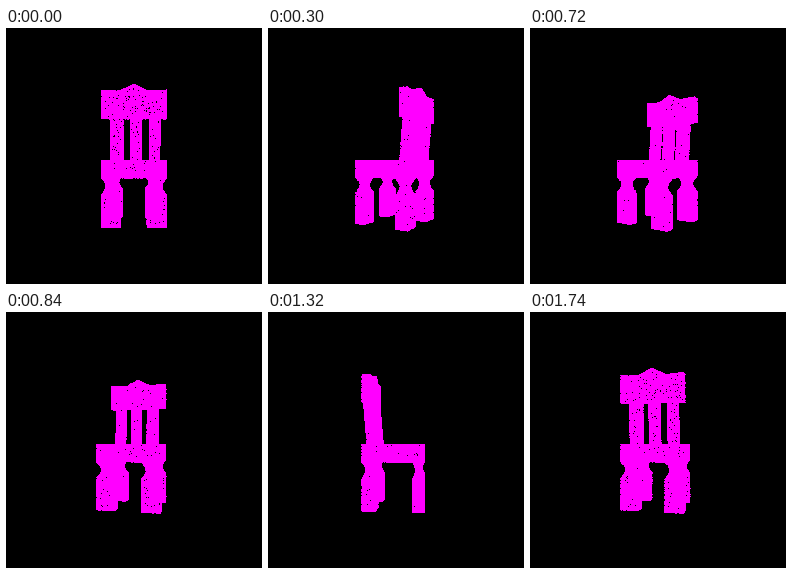
Write an HTML page with a canvas that moves like this. It is 256 px wide and 256 px high and loops after 1.8 s.

```html
<!DOCTYPE html>
<html lang="en">
<head>
<meta charset="utf-8">
<title>Turning chair</title>
<style>
  html, body { margin: 0; width: 100%; height: 100%; overflow: hidden; background: #000; }
  canvas { display: block; width: 256px; height: 256px; }
</style>
</head>
<body>
<canvas id="stage" width="256" height="256"></canvas>
<script>
const SIZE = 256, STEP_MS = 60, STEPS = 30;
const CENTER_X = 128, HORIZON = 132, CAMERA = 275;
const HALF_W = 29.3, HALF_D = 28, DENSITY = 1.9;
const BLACK = 0xff000000, MAGENTA = 0xffff00ff;

const ctx = document.getElementById('stage').getContext('2d');
const picture = ctx.createImageData(SIZE, SIZE);
const pixels = new Uint32Array(picture.data.buffer);

let seed = 7;
function random() {
  seed = (Math.imul(seed, 1664525) + 1013904223) >>> 0;
  return seed / 4294967296;
}

const points = [];

// Scatters points over the six faces of a box, then bends them with warp.
function addBox(min, max, warp = p => p) {
  const size = max.map((v, i) => v - min[i]);
  for (let axis = 0; axis < 3; axis++) {
    const area = size[(axis + 1) % 3] * size[(axis + 2) % 3];
    for (const side of [0, 1]) {
      for (let n = Math.round(area * DENSITY); n > 0; n--) {
        const p = min.map((v, i) => v + size[i] * (i === axis ? side : random()));
        points.push(warp(p));
      }
    }
  }
}

function addRail() {
  const bottom = 38;
  const crest = x => 62 + 6.3 * Math.max(0, 1 - Math.abs(x) / 13) + (x / HALF_W) ** 2;
  addBox([-HALF_W, bottom, 20], [HALF_W, bottom + 25, HALF_D],
    ([x, y, z]) => [x, bottom + (y - bottom) / 25 * (crest(x) - bottom), z]);
}

// Spindles lean back towards the rail.
function addSpindle(left, right) {
  const height = 39;
  addBox([left, 0, 16], [right, height, 24.5],
    ([x, y, z]) => [x, y, z + 3.5 * y / height]);
}

// Legs are square with a narrow neck below the seat.
function addLeg(x0, x1, z0, z1) {
  const cx = (x0 + x1) / 2, cz = (z0 + z1) / 2;
  addBox([x0, -61, z0], [x1, -16, z1], ([x, y, z]) => {
    const u = Math.min(1, Math.max(0, (-y - 16.5) / 15));
    const k = 1 - 0.45 * Math.sin(Math.PI * u);
    return [cx + (x - cx) * k, y, cz + (z - cz) * k];
  });
}

addRail();
addSpindle(-21.3, -10.2);
addSpindle(-2.8, 6.4);
addSpindle(14.2, 23.6);
addBox([-HALF_W, -16.2, -HALF_D], [HALF_W, 0, HALF_D]);
for (const [x0, x1] of [[-HALF_W, -12.7], [12.2, HALF_W]]) {
  addLeg(x0, x1, -HALF_D, -HALF_D + 10);
  addLeg(x0, x1, HALF_D - 12, HALF_D);
}

function draw(angle) {
  const c = Math.cos(angle), s = Math.sin(angle);
  pixels.fill(BLACK);
  for (const [x, y, z] of points) {
    const scale = CAMERA / (CAMERA - (z * c - x * s));
    const px = Math.floor(CENTER_X + (x * c + z * s) * scale);
    const py = Math.floor(HORIZON - y * scale);
    pixels[py * SIZE + px] = MAGENTA;
  }
  ctx.putImageData(picture, 0, 0);
}

const start = performance.now();
let shown = -1;
function tick() {
  const step = Math.floor((performance.now() - start) / STEP_MS) % STEPS;
  if (step !== shown) {
    shown = step;
    draw(step / STEPS * 2 * Math.PI);
  }
  requestAnimationFrame(tick);
}
tick();
</script>
</body>
</html>
```
